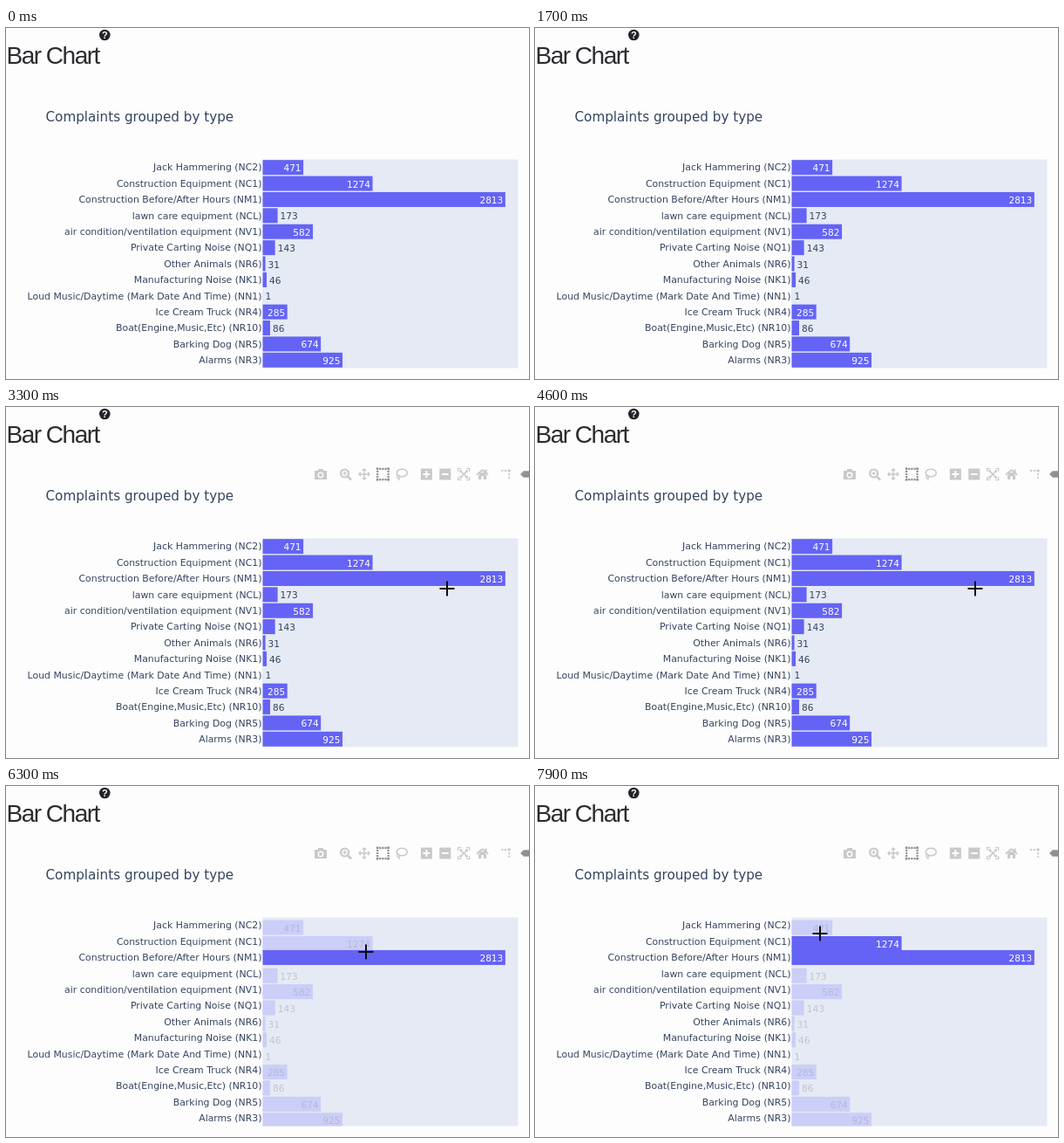
An HTML page with a canvas that plays this animation: 600 px wide and 402 px high, repeating every 8 s.

```html
<!DOCTYPE html>
<html lang="en">
<head>
<meta charset="utf-8">
<title>Bar Chart</title>
<style>
  html, body { margin: 0; width: 100%; height: 100%; overflow: hidden; background: #fdfdfd; }
  canvas { display: block; width: 600px; height: 402px; }
</style>
</head>
<body>
<canvas id="stage" width="600" height="402"></canvas>
<script>
const ctx = document.getElementById('stage').getContext('2d');
const LOOP = 8000, STEP = 100;
const PAGE = '#fdfdfd', PLOT_BG = '#e5eaf5', BAR = '#6563f5', INK = '#34445f';
const LEFT = 294.5, TOP = 150.5, WIDTH = 293, HEIGHT = 239;
const SANS = '"DejaVu Sans", Verdana, sans-serif';
const ARIAL = '"Liberation Sans", Arial, sans-serif';

const complaints = {
  'Jack Hammering (NC2)': 471,
  'Construction Equipment (NC1)': 1274,
  'Construction Before/After Hours (NM1)': 2813,
  'lawn care equipment (NCL)': 173,
  'air condition/ventilation equipment (NV1)': 582,
  'Private Carting Noise (NQ1)': 143,
  'Other Animals (NR6)': 31,
  'Manufacturing Noise (NK1)': 46,
  'Loud Music/Daytime (Mark Date And Time) (NN1)': 1,
  'Ice Cream Truck (NR4)': 285,
  'Boat(Engine,Music,Etc) (NR10)': 86,
  'Barking Dog (NR5)': 674,
  'Alarms (NR3)': 925
};
const rows = Object.entries(complaints);
const ROW = HEIGHT / rows.length;
const UNIT = WIDTH * 0.95 / Math.max(...Object.values(complaints));

const clicks = [{ row: 2, at: 4800 }, { row: 1, at: 6700 }];
const ENTER = 2000;
const stops = [
  { t: ENTER, x: 101, y: 38 },
  { t: 2300, x: 108, y: 65 },
  { t: 3100, x: 506, y: 208 },
  { t: 4500, x: 506, y: 208 },
  { t: 5100, x: 489, y: 205.5 },
  { t: 6300, x: 413, y: 190 },
  { t: 7900, x: 327, y: 169 }
];

const mix = (a, b, k) => a + (b - a) * k;
const ease = k => k * k * (3 - 2 * k);

function text(str, x, y, font, color, align = 'left', spacing = '0px') {
  ctx.font = font;
  ctx.fillStyle = color;
  ctx.textAlign = align;
  ctx.letterSpacing = spacing;
  ctx.fillText(str, x, y);
}

function rect(x, y, w, h, color) {
  ctx.fillStyle = color;
  ctx.fillRect(x, y, w, h);
}

// centred box
function box(x, y, w, h, color = ctx.strokeStyle) {
  rect(x - w / 2, y - h / 2, w, h, color);
}

function plus(size, weight, color) {
  box(0, 0, size, weight, color);
  box(0, 0, weight, size, color);
}

function disc(x, y, r, color = ctx.strokeStyle) {
  ctx.fillStyle = color;
  ctx.beginPath();
  ctx.arc(x, y, r, 0, 2 * Math.PI);
  ctx.fill();
}

function ring(x, y, rx, ry, weight) {
  ctx.lineWidth = weight;
  ctx.beginPath();
  ctx.ellipse(x, y, rx, ry, 0, 0, 2 * Math.PI);
  ctx.stroke();
}

function line(x0, y0, x1, y1, weight, dash = []) {
  ctx.lineWidth = weight;
  ctx.setLineDash(dash);
  ctx.beginPath();
  ctx.moveTo(x0, y0);
  ctx.lineTo(x1, y1);
  ctx.stroke();
  ctx.setLineDash([]);
}

// triangle with its tip at x, y; negative size points right
function wedge(x, y, size) {
  ctx.beginPath();
  ctx.moveTo(x, y);
  ctx.lineTo(x + size, y - size);
  ctx.lineTo(x + size, y + size);
  ctx.fill();
}

function fourTurns(draw) {
  for (let i = 0; i < 4; i++) {
    draw();
    ctx.rotate(Math.PI / 2);
  }
}

function camera() {
  box(0, 1, 14, 10);
  box(0, -4.5, 6, 3);
  disc(0, 1, 3.4, PAGE);
  disc(0, 1, 2);
}

function zoom() {
  ring(-1, -1, 4.5, 4.5, 2.2);
  line(2, 2, 6.5, 6.5, 2.6);
  ctx.translate(-1, -1);
  plus(4.5, 1.3);
}

function pan() {
  plus(11, 1.5);
  fourTurns(() => wedge(7, 0, -3));
}

function select() {
  fourTurns(() => line(-7.5, -6.2, 7.5, -6.2, 2.2, [2.2, 1]));
}

function lasso() {
  ring(0.5, -1.5, 6, 4.3, 1.6);
  ring(-3.5, 3, 1.6, 1.6, 1.2);
  line(-4, 4, -2.5, 7, 1.4);
}

function zoomIn() {
  box(0, 0, 13, 13);
  plus(8, 2, PAGE);
}

function zoomOut() {
  box(0, 0, 13, 13);
  box(0, 0, 8, 2, PAGE);
}

function autoscale() {
  fourTurns(() => {
    line(3, -6.5, 7, -6.5, 1.2);
    line(6.5, -7, 6.5, -3, 1.2);
    line(0, 0, 4, 4, 1.6);
    box(3.5, 3.5, 2.5, 2.5);
  });
}

function home() {
  for (const side of [-1, 1]) {
    line(0, -5, side * 6.5, 0.7, 2);
    box(side * 2.9, 3.5, 3.2, 5);
  }
  box(0, 0.2, 7, 4);
  box(4, -3.5, 2, 4);
}

function spikes() {
  line(-7, -4, 0, -4, 1.8, [2.2, 1.6]);
  line(2, -1, 2, 6, 1.8, [2.2, 1.6]);
  box(2, -4, 3, 3);
}

function hoverTag() {
  wedge(-6.5, 0, 3.7);
  box(2, 0, 10, 7.4);
}

const toolGroups = [
  [camera], [zoom, pan, select, lasso],
  [zoomIn, zoomOut, autoscale, home], [spikes, hoverTag]
];

function drawHeader() {
  text('Bar Chart', 0.5, 41, '28px ' + ARIAL, '#2b2c30', 'left', '-1.5px');
  disc(113.3, 8, 6.3, '#212429');
  text('?', 113.3, 12, 'bold 11px ' + ARIAL, '#fff', 'center');
  text('Complaints grouped by type', 45.5, 106.5, '15.2px ' + SANS, INK);
}

function drawChart(t) {
  const selected = clicks.filter(c => t >= c.at).map(c => c.row);
  rect(LEFT, TOP, WIDTH, HEIGHT, PLOT_BG);
  rows.forEach(([label, value], i) => {
    const mid = TOP + ROW * (i + 0.5);
    const end = LEFT + value * UNIT;
    const dimmed = selected.length > 0 && !selected.includes(i);
    // every bar but the first pick sits lower during a selection
    const drop = selected.length > 0 && i !== selected[0] ? 2.4 : 0;
    const top = mid - 8.5 + drop;
    const inside = value > 200;
    const color = dimmed ? (inside ? '#b4b8d6' : '#bfc4d2') : (inside ? '#fff' : INK);
    text(label, 293.5, mid + 3.8, '10.9px ' + SANS, INK, 'right');
    rect(LEFT, top, end - LEFT, Math.min(17, TOP + HEIGHT - top), dimmed ? '#cbcef6' : BAR);
    text(value, end + (inside ? -2.5 : 3), mid + 4.5 + drop, '10.6px ' + SANS, color, inside ? 'right' : 'left');
  });
}

// the toolbar fades in on entry and again after each click
function drawToolbar(t) {
  const start = [ENTER, ...clicks.map(c => c.at)].filter(s => t >= s).pop();
  if (start === undefined) return;
  const alpha = Math.min(1, (t - start) / 500);
  let x = 361;
  for (const group of toolGroups) {
    for (const draw of group) {
      const active = draw === select || draw === hoverTag;
      ctx.save();
      ctx.globalAlpha = alpha;
      ctx.translate(x, 77);
      ctx.fillStyle = ctx.strokeStyle = active ? '#8f8f94' : '#c9c9cc';
      draw();
      ctx.restore();
      x += 21.4;
    }
    x += 7.2;
  }
}

function cursorAt(t) {
  const next = stops.findIndex(s => s.t > t);
  if (next < 0) return stops[stops.length - 1];
  const a = stops[next - 1], b = stops[next];
  const k = ease((t - a.t) / (b.t - a.t));
  return { x: mix(a.x, b.x, k), y: mix(a.y, b.y, k) };
}

function drawArrow() {
  ctx.lineWidth = 1;
  ctx.strokeStyle = '#222';
  ctx.fillStyle = '#fff';
  ctx.beginPath();
  ctx.moveTo(0, 0);
  ctx.lineTo(0, 11.5);
  ctx.lineTo(2.7, 9.2);
  ctx.lineTo(5, 13.5);
  ctx.lineTo(6.5, 12.6);
  ctx.lineTo(4.6, 8.5);
  ctx.lineTo(8, 8.3);
  ctx.closePath();
  ctx.fill();
  ctx.stroke();
}

function drawCursor(t) {
  if (t < ENTER) return;
  const { x, y } = cursorAt(t);
  ctx.save();
  ctx.translate(Math.round(x), Math.round(y));
  if (x > LEFT && y > TOP) plus(17, 2, '#0b0b0f');
  else drawArrow();
  ctx.restore();
}

function render(now) {
  const t = Math.floor(now % LOOP / STEP) * STEP;
  rect(0, 0, 600, 402, PAGE);
  drawHeader();
  drawChart(t);
  drawToolbar(t);
  drawCursor(t);
  requestAnimationFrame(render);
}
requestAnimationFrame(render);
</script>
</body>
</html>
```
